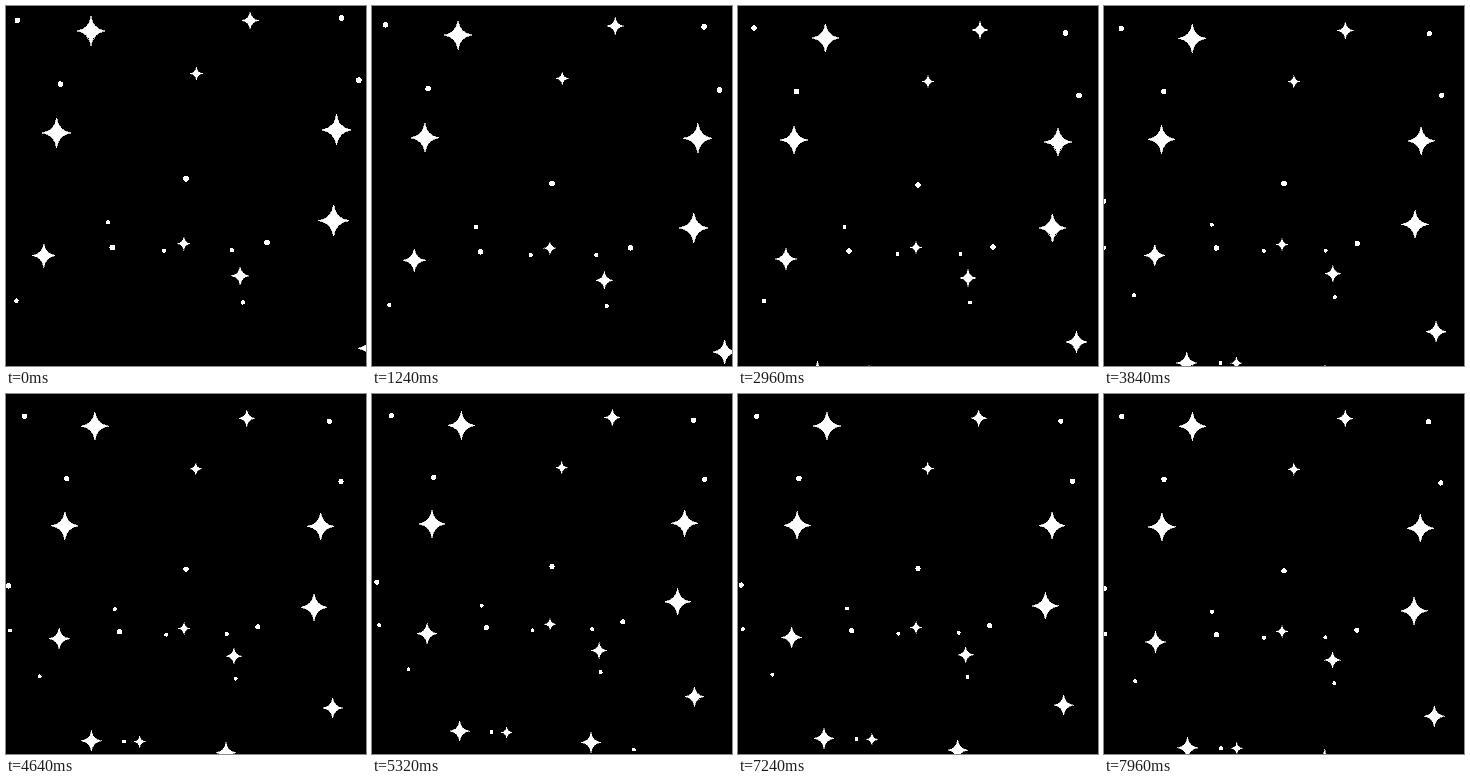
An HTML page for the animation above (8000 ms loop, 360 by 360 pixels).

```html
<!DOCTYPE html>
<html lang="en">
<head>
<meta charset="utf-8">
<title>Star drift</title>
<style>
  html, body { margin: 0; width: 100%; height: 100%; overflow: hidden; background: #000; }
  svg { display: block; width: 100vw; height: 100vh; }
</style>
</head>
<body>
<svg id="sky" viewBox="0 0 360 360" fill="#fff" stroke="#fff" shape-rendering="crispEdges"></svg>
<script>
const LOOP = 8;      // seconds
const TURN = 6.03;   // the camera reverses here
const REST = 3.07;   // time before the turn at which the places below hold
const MID = 180;

const SPARKLE = ["path", { d: "M0-1.03Q.13-.13 1 0Q.13.13 0 1.03Q-.13.13-1 0Q-.13-.13 0-1.03Z", "stroke-width": .05 }];
const DOT = ["circle", { r: 1, "stroke-width": 0 }];

// Stars grouped by shape and radius; places are measured from the centre.
const groups = [
  [SPARKLE, 13.9, [[-92.5, -148], [-124, -46], [140, -44], [134.5, 42]]],
  [SPARKLE, 10.8, [[-132, 73], [158.5, 156], [-100.5, 186], [42.5, 199]]],
  [SPARKLE, 8.3, [[62, -156], [50, 92]]],
  [SPARKLE, 6.2, [[10, -104.5], [-2, 61.5], [-49, 185.5]]],
  [DOT, 2.7, [[-164, -158], [147.5, -153], [-121.5, -94.5], [161, -90.5],
              [0, -1], [-69, 65], [75, 61], [-184, 17.5]]],
  [DOT, 2.1, [[-73.5, 41], [-20.5, 68], [42.5, 68], [52, 116.5], [-154, 115],
              [-184, 65.5], [-65.5, 185.5], [90.5, 212]]]
];

// The field is a curved sheet, nearest at the lower right.
const nearness = (x, y) =>
  Math.exp(-.68 + .0038 * y + .0015 * x + 1.3e-5 * x * x - 5e-6 * x * y);

const sky = document.getElementById("sky");

function addStar([tag, attrs], size, [x, y]) {
  const el = document.createElementNS(sky.namespaceURI, tag);
  for (const key in attrs) el.setAttribute(key, attrs[key]);
  sky.append(el);
  return { el, x, y, size, near: nearness(x, y) };
}

const stars = groups.flatMap(([shape, size, places]) =>
  places.map(place => addStar(shape, size, place)));

// The camera backs away steadily while rising and falling along an arc.
function camera(t) {
  const left = Math.abs(t - TURN);
  const e = left - 3.55;
  return { back: .0335 * (REST - left), lift: .45 - 1.87 * e * e - .04 * e ** 3 };
}

function draw(t) {
  const { back, lift } = camera(t);
  for (const { el, x, y, size, near } of stars) {
    const k = 1 / (1 + near * back);
    const px = MID + x * k;
    const py = MID + (y + near * lift) * k;
    el.setAttribute("transform",
      `translate(${px.toFixed(2)} ${py.toFixed(2)}) scale(${(size * k).toFixed(3)})`);
  }
}

const start = performance.now();
function tick() {
  draw((performance.now() - start) / 1000 % LOOP);
  requestAnimationFrame(tick);
}
tick();
</script>
</body>
</html>
```
